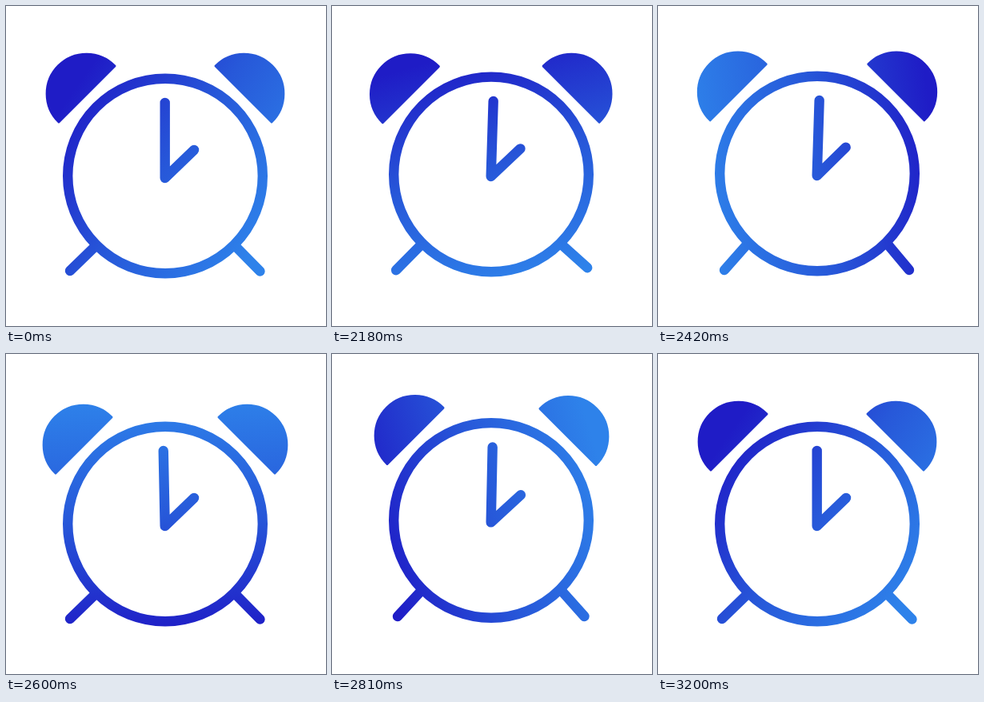
These frames come from a looping animation (400x400 px, 3230 ms). An HTML page:

```html
<!DOCTYPE html>
<html lang="en">
<head>
<meta charset="utf-8">
<title>Alarm clock</title>
<style>
  html, body { margin: 0; width: 100%; height: 100%; overflow: hidden; background: #fff; }
  svg { display: block; width: 100vw; height: 100vh; }
  .line { fill: none; stroke: url(#blue); stroke-width: 12.4; stroke-linecap: round; stroke-linejoin: round; }
  .bell { fill: url(#blue); stroke: url(#blue); stroke-width: 3; stroke-linejoin: round; }
</style>
</head>
<body>
<svg viewBox="0 0 400 400">
  <defs>
    <linearGradient id="blue" gradientUnits="userSpaceOnUse">
      <stop offset="0" stop-color="#1f1cc6"/>
      <stop offset=".5" stop-color="#2758d9"/>
      <stop offset="1" stop-color="#2e82ea"/>
    </linearGradient>
  </defs>
  <path id="bellL" class="bell"/>
  <path id="bellR" class="bell"/>
  <path id="legL" class="line"/>
  <path id="legR" class="line"/>
  <circle id="ring" class="line" cx="199" r="121.8"/>
  <path id="hands" class="line"/>
</svg>
<script>
const LOOP = 3230, START = 2000, STEP = 30;
const CX = 199, CY = 212.5;
const $ = id => document.getElementById(id);
const rad = deg => deg * Math.PI / 180;

// Each track lists [step, value] pairs.
const tracks = {
  lift:   [[0, 0], [1, -3], [4, 0], [9, -5.8], [14, -3], [20, 0], [28, -4.8], [36, 0]],
  slideL: [[0, 0], [1, 2], [4, 3.6], [10, 0], [14, .8], [20, 4], [27, -3], [36, 3.7], [40, 0]],
  slideR: [[0, 0], [1, 2.2], [4, 4], [10, -3.2], [14, .8], [20, 4], [27, -2], [36, 3.8], [40, 0]],
  footLx: [[0, 80], [1, 85], [4, 80], [10, 81], [14, 83], [20, 80], [27, 82], [36, 80]],
  footLy: [[0, 331], [1, 331], [4, 331], [10, 328], [14, 330], [20, 331], [27, 328], [36, 331]],
  footRx: [[0, 317.5], [1, 312], [4, 317.5], [10, 321], [14, 314], [20, 317.5], [27, 315.5], [36, 317.5]],
  footRy: [[0, 331.5], [1, 331], [4, 331.5], [10, 315], [14, 330], [20, 331.5], [27, 328], [36, 331.5]],
  minute: [[0, 0], [1, 1.1], [10, 2], [14, 1.8], [20, -1.2], [27, 1.2], [36, 0]],
  hour:   [[0, 0], [1, 1], [10, .3], [14, -.5], [20, 0], [27, 1.4], [36, 0]],
  shade:  [[0, -145], [10, -62], [14, -8], [20, 88], [27, 163], [36, 215]]
};

// Cubic curve through the keys, flat at the ends and at turning points.
function at(keys, n) {
  const last = keys.length - 1;
  if (n >= keys[last][0]) return keys[last][1];
  let i = 0;
  while (n >= keys[i + 1][0]) i++;
  const slope = k => (keys[k + 1][1] - keys[k][1]) / (keys[k + 1][0] - keys[k][0]);
  const tangent = k => {
    if (k === 0 || k === last) return 0;
    const a = slope(k - 1), b = slope(k);
    return a * b <= 0 ? 0 : 2 * a * b / (a + b);
  };
  const [t0, v0] = keys[i], [t1, v1] = keys[i + 1];
  const h = t1 - t0, u = (n - t0) / h, w = 1 - u;
  return v0 * w * w * (1 + 2 * u) + v1 * u * u * (3 - 2 * u)
       + h * u * w * (tangent(i) * w - tangent(i + 1) * u);
}

function bell(side, slide, lift) {
  const x = d => CX + side * (d + slide);
  const y = slide + lift;
  return `M${x(133)} ${145 + y}A49.5 49.5 0 1 ${side < 0 ? 1 : 0} ${x(63)} ${75 + y}Z`;
}

function tip(x, y, length, deg) {
  return `${x + length * Math.sin(rad(deg))} ${y - length * Math.cos(rad(deg))}`;
}

function draw(ms) {
  const n = Math.max(0, Math.floor((ms - START) / STEP));
  const p = {};
  for (const name in tracks) p[name] = at(tracks[name], n);

  $('ring').setAttribute('cy', CY + p.lift);
  $('bellL').setAttribute('d', bell(-1, p.slideL, p.lift));
  $('bellR').setAttribute('d', bell(1, p.slideR, p.lift));

  const hip = 299 + p.lift;
  $('legL').setAttribute('d', `M113 ${hip}L${p.footLx} ${p.footLy}`);
  $('legR').setAttribute('d', `M285.5 ${hip}L${p.footRx} ${p.footRy}`);

  const hub = 215 + p.lift;
  $('hands').setAttribute('d',
    `M${tip(198.7, hub, 94, p.minute)}L198.7 ${hub}L${tip(198.7, hub, 50.5, 46 + p.hour)}`);

  const dx = 150 * Math.cos(rad(p.shade)), dy = 150 * Math.sin(rad(p.shade));
  const ends = { x1: CX + dx, y1: 204 + dy, x2: CX - dx, y2: 204 - dy };
  for (const name in ends) $('blue').setAttribute(name, ends[name]);
}

let begin = null;
function tick(now) {
  if (begin === null) begin = now;
  draw((now - begin) % LOOP);
  requestAnimationFrame(tick);
}
draw(0);
requestAnimationFrame(tick);
</script>
</body>
</html>
```
